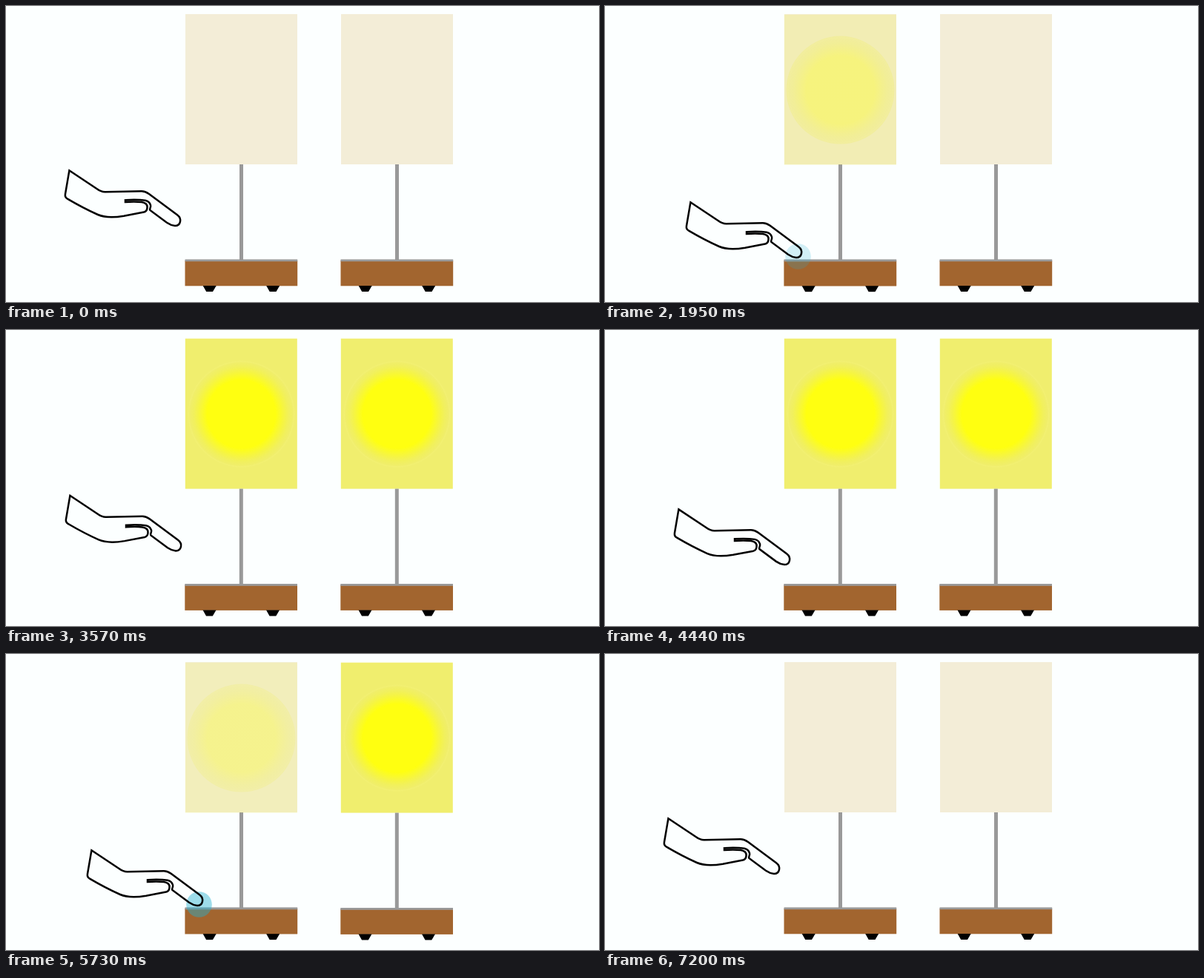
These frames come from a looping animation (800 by 400 pixels, 7.23 s). An HTML page with a canvas:

```html
<!DOCTYPE html>
<html lang="en">
<head>
<meta charset="utf-8">
<title>Two lamps</title>
<style>
html, body { margin: 0; width: 100%; height: 100%; overflow: hidden; background: #fcffff; }
canvas { display: block; }
</style>
</head>
<body>
<canvas id="stage" width="800" height="400"></canvas>
<script>
const ctx = document.getElementById('stage').getContext('2d');
const LOOP = 7230, CYCLE = 3600, STEP = 30;
const LAMP_GAP = 210, FADE = 450;
const TOUCH = 1800, RELEASE = 2700;

const handOutline = new Path2D(`
  M85.4 222.3 L122.5 247 Q128.5 251.4 134 251.2 L183 250.2
  Q188 250.2 193 254 L231 282.3 C238 287.5 235.5 297 228 297
  Q222.5 296.6 217 292.8 L194.4 276 C193 273.5 196 272.5 195 269
  Q193.5 264 188 262.8 Q178 261.3 161 262.2 L161 264.9
  Q174 263.9 183 265 C189.5 266 191 269.5 190.5 273
  Q190 277.5 186 278.6 L159 283.7 C142 286.5 132 285.5 124 282
  Q104 273 83 260.6 Q79.3 258.6 79.9 254.5 Z`);

const ramp = (t, from, to) => Math.min(1, Math.max(0, (t - from) / (to - from)));

function rect(color, x, y, w, h) {
  ctx.fillStyle = color;
  ctx.fillRect(x, y, w, h);
}

function foot(x) {
  ctx.fillStyle = '#000';
  ctx.beginPath();
  ctx.moveTo(x, 378);
  ctx.lineTo(x + 18, 378);
  ctx.lineTo(x + 13.3, 386);
  ctx.lineTo(x + 4.5, 386);
  ctx.fill();
}

function bulbGlow() {
  const g = ctx.createRadialGradient(317.7, 113, 0, 317.7, 113, 73);
  const stops = [
    [46, '#ffff10'], [52, '#fafa2b'], [58, '#f5f445'],
    [64, '#f1f05d'], [69.5, '#f0ee6a'], [71, '#f2f072'], [72.5, '#f0ee6e']
  ];
  for (const [r, color] of stops) g.addColorStop(r / 73, color);
  return g;
}

function lamp(lit) {
  rect(lit ? '#f0ee6e' : '#f3edd7', 242, 11, 151, 203);
  if (lit) {
    ctx.fillStyle = bulbGlow();
    ctx.beginPath();
    ctx.arc(317.7, 113, 73, 0, 2 * Math.PI);
    ctx.fill();
  }
  rect('#999', 315, 214, 5, 129);
  rect('#a2652f', 241.5, 344, 151.7, 34.3);
  rect('#999', 241.5, 342.4, 151.7, 2.8);
  foot(265.7);
  foot(351.2);
}

function drawLamp(x, level) {
  ctx.save();
  ctx.translate(x, 0);
  if (level < 1) lamp(false);
  if (level > 0) {
    ctx.globalAlpha = level;
    ctx.translate(-0.2, 0.6);
    lamp(true);
  }
  ctx.restore();
}

function drawTouch(level) {
  if (level <= 0) return;
  ctx.fillStyle = `rgba(35, 176, 207, ${0.6 * level})`;
  ctx.beginPath();
  ctx.arc(260.5, 338.5, 17.3, 0, 2 * Math.PI);
  ctx.fill();
}

function drawHand(reach) {
  ctx.save();
  ctx.translate(30 * reach, 43 * reach);
  ctx.strokeStyle = '#000';
  ctx.lineWidth = 2.5;
  ctx.stroke(handOutline);
  ctx.restore();
}

function draw(time) {
  const t = time % CYCLE;
  const turningOff = time >= CYCLE && time < 2 * CYCLE;
  const light = start => {
    const p = ramp(t, start, start + FADE);
    return time >= 2 * CYCLE ? 0 : turningOff ? 1 - p : p;
  };

  rect('#fcffff', 0, 0, 800, 400);
  drawLamp(0, light(TOUCH));
  drawLamp(LAMP_GAP, light(TOUCH + FADE));
  drawTouch(ramp(t, TOUCH, TOUCH + FADE) * (1 - ramp(t, TOUCH + FADE, RELEASE + FADE)));
  drawHand(ramp(t, 0, TOUCH) - ramp(t, RELEASE, CYCLE));
}

const start = performance.now();
function frame() {
  const time = (performance.now() - start) % LOOP;
  draw(Math.floor(time / STEP) * STEP);
  requestAnimationFrame(frame);
}
frame();
</script>
</body>
</html>
```
